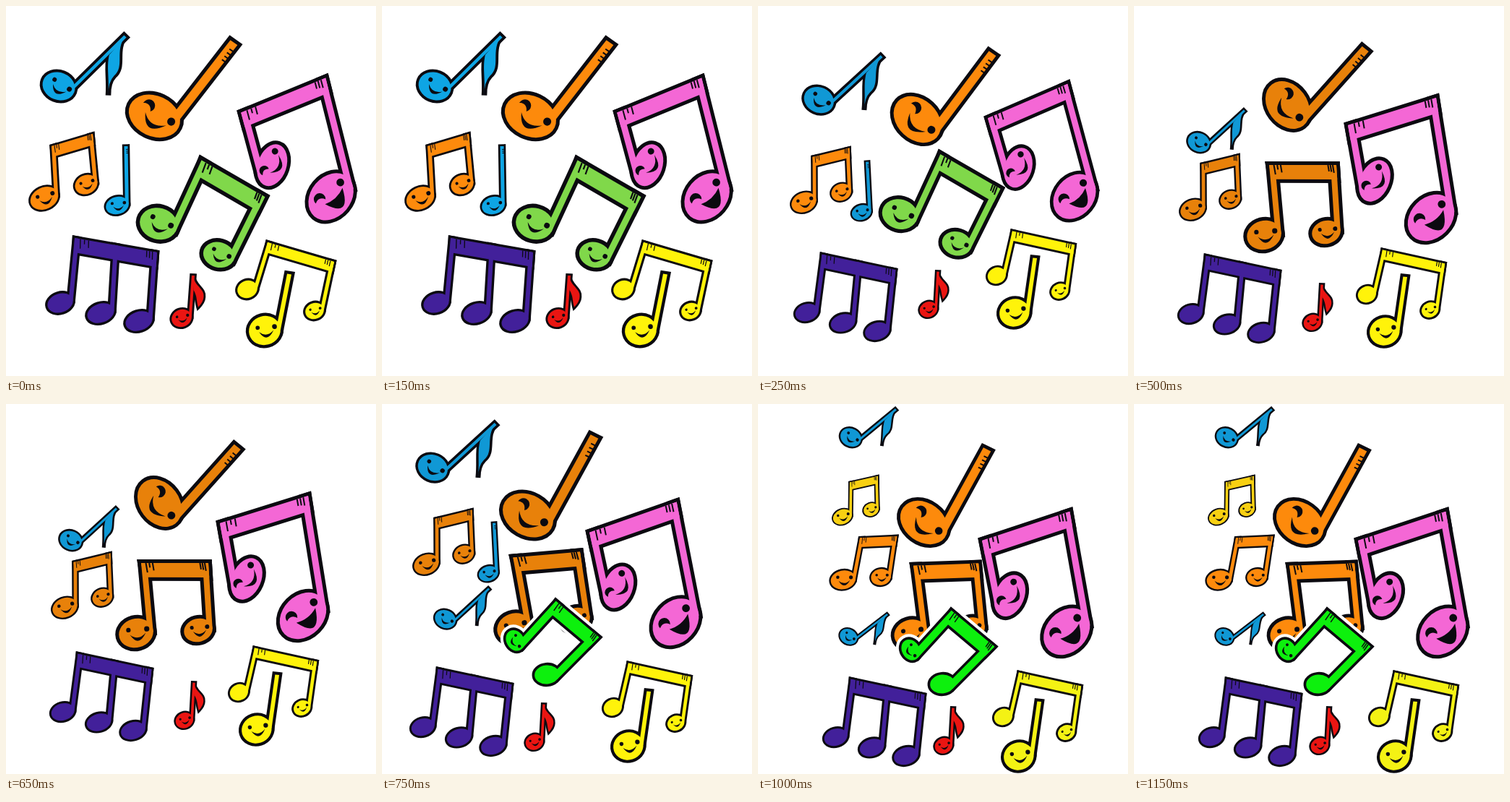
These frames come from a looping animation (512x512 px, 1.25 s). An HTML page with a canvas:

```html
<!DOCTYPE html>
<html lang="en">
<head>
<meta charset="utf-8">
<title>Dancing notes</title>
<style>
html, body { margin: 0; width: 100%; height: 100%; overflow: hidden; background: #fff; }
canvas { display: block; width: 512px; height: 512px; }
</style>
</head>
<body>
<canvas id="stage" width="512" height="512"></canvas>
<script>
const HOLD = 250, STEPS = 5, INK = '#0b0a10';
const ctx = document.getElementById('stage').getContext('2d');

const blue = step => step ? '#1098d5' : '#0ea5e4';
const orange = step => step === 2 || step === 3 ? '#e8810a' : '#fd8a0c';
const greenThenOrange = step => step < 2 ? '#80d84a' : orange(step);
const yellow = step => step < 4 ? '#fff30a' : '#f4f214';
const always = color => () => color;

// Shapes are built from stem tips and heads, measured from the note's first tip.
// Head: x, y, rx, ry, tilt, mood. "curl" bends a flag, "rungs" stripes the stem.
const eighth = {
  line: 3.8, stem: 4.5, curl: .4,
  tips: [[-3, 4]], heads: [[-95, 73, 23, 19, 22, 'smile']]
};
const smallPair = {
  line: 2.7, stem: 5.5, depth: 15,
  tips: [[3, 2], [60, -15]],
  heads: [[-7, 74, 20, 15, -25, 'smile'], [51, 55, 16, 13, -25, 'smile']]
};

// Pose: x, y, turn, size, nod. "settle" is the usual turn and size after the first step.
const notes = [
  { ...eighth, color: blue, settle: [2, .92],
    poses: [[168, 38], [174, 66], [155, 142, 2, .67], [160, 24], [193, 5, 5, .64]] },
  { ...eighth, color: blue, poses: [, , , [150, 253, 2, .64], [181, 289, 7, .54]] },
  { color: blue, line: 2.7, stem: 5, rungs: 3, settle: [-2, .85],
    tips: [[0, 2]], heads: [[-12, 84, 16, 12, -15, 'smile']],
    poses: [[166, 192], [151, 214], , [155, 163]] },
  { ...smallPair, color: orange, settle: [3, .88],
    poses: [[60, 192], [73, 207], [91, 217], [71, 157], [139, 183, 14, .86]] },
  { ...smallPair, color: always('#f8d012'), poses: [, , , , [125, 107, 4, .67]] },
  { color: orange, line: 5, stem: 12, rungs: 4,
    tips: [[-2, 4]], heads: [[-94, 113, 37, 28, 30, 'wink']],
    poses: [[318, 47, 9, 1, -14], [327, 62, 8, .99, 5], [323, 56, 13, .97, 10], [296, 41], [319, 59, 0, .96, 6]] },
  { color: greenThenOrange, line: 5, stem: 8, depth: 20,
    tips: [[5, 4], [98, 4]],
    heads: [[-2, 101, 24, 20, -15, 'smile'], [84, 97, 20, 16, -15, 'smile']],
    poses: [[268, 207, 30, 1.09], [250, 199, 30, 1.03], [182, 216], [176, 209, -5], [210, 220, -2, .97]] },
  { color: always('#f467d5'), line: 5, stem: 9, depth: 21, outward: true,
    tips: [[5, 3], [127, -35]],
    heads: [[42, 80, 30, 20, -67, 'wink'], [120, 131, 36, 28, -45, 'laugh']],
    poses: [[320, 145, -5, .99], [313, 153, -6, .94], [291, 162], [282, 175, -2], [305, 186, -1]] },
  { color: always('#0df00d'), line: 3.6, stem: 10, depth: 18, halo: 4,
    tips: [[4, 4], [82, 4]],
    heads: [[-4, 82, 15, 12, 20, 'smile'], [60, 90, 17, 13, -45]],
    poses: [, , , [240, 267, 40], [267, 280, 40]] },
  { color: always('#42209a'), line: 3.3, stem: 6, depth: 20, settle: [2, .9],
    tips: [[4, 4], [61, 14], [118, 24]],
    heads: [[-16, 94, 18, 13, -18], [40, 108, 19, 13, -18], [93, 119, 19, 13, -18]],
    poses: [[91, 317], [85, 340], [96, 342], [74, 363], [125, 377]] },
  { color: yellow, line: 3.1, stem: 5, depth: 14, settle: [-4, .92],
    tips: [[3, 3], [95, 30]],
    heads: [[-25, 68, 14, 12, -20], [68, 98, 13, 11, -20, 'smile']],
    poses: [[359, 324], [349, 309], [341, 335], [338, 356], [358, 369]] },
  { color: yellow, line: 4.3, stem: 6, settle: [-3, .95],
    tips: [[0, 4]], heads: [[-34, 82, 22, 20, -15, 'smile']],
    poses: [[392, 367], [383, 345], [375, 371], [369, 394], [389, 408]] },
  { color: always('#ea1512'), line: 2.8, stem: 4, curl: .15, settle: [-1, .88],
    tips: [[0, 3]], heads: [[-16, 62, 14, 12, -20, 'smile']],
    poses: [[259, 370], [249, 365], [260, 383], [224, 413], [270, 418]] }
];

const rad = deg => deg * Math.PI / 180;
const add = ([x, y], [dx, dy], k = 1) => [x + dx * k, y + dy * k];
const toward = ([x, y], [x2, y2]) => {
  const d = Math.hypot(x2 - x, y2 - y);
  return [(x2 - x) / d, (y2 - y) / d];
};
const random = i => Math.abs(Math.sin(i * 12.9898) * 43758.5453) % 1;

function polygon(...points) {
  const path = new Path2D();
  points.forEach(p => path.lineTo(...p));
  path.closePath();
  return path;
}

// The stem touches the head at its outermost point; the head nods about that point
function joinHead([x, y, rx, ry, tilt, mood], side, nod) {
  const c = Math.cos(rad(tilt)), s = Math.sin(rad(tilt));
  const reach = Math.hypot(rx * c, ry * s);
  const arm = [side * reach, side * (rx * rx - ry * ry) * s * c / reach];
  const n = Math.cos(rad(nod)), m = Math.sin(rad(nod));
  const joint = [x + arm[0], y + arm[1]];
  const center = [joint[0] - arm[0] * n + arm[1] * m, joint[1] - arm[0] * m - arm[1] * n];
  return { joint, center, rx, ry, tilt: tilt + nod, mood };
}

function flag(tip, down, right, length, curl) {
  const at = (u, v) => add(add(tip, down, u * length), right, v * length);
  const path = new Path2D();
  path.moveTo(...tip);
  path.bezierCurveTo(...at(.25, .03), ...at(.3, .29), ...at(.5, .27));
  path.quadraticCurveTo(...at(.62, .27), ...at(.75, curl));
  path.bezierCurveTo(...at(.56, curl * .6), ...at(.5, .12), ...at(.34, .02));
  path.closePath();
  return path;
}

function build(note, nod) {
  const { tips, stem, depth, curl } = note, last = tips.length - 1;
  const parts = [], marks = new Path2D();
  const heads = note.heads.map((h, i) => joinHead(h, note.outward && i === 0 ? -1 : 1, nod));
  const downs = tips.map((tip, i) => toward(tip, heads[i].joint));
  const across = last ? toward(tips[0], tips[last]) : [downs[0][1], -downs[0][0]];

  tips.forEach((tip, i) => {
    const { joint, center } = heads[i];
    const left = add(tip, across, last ? -stem * i / last : -stem / 2);
    const inner = add(joint, across, note.outward && i === 0 ? stem : -stem);
    const root = add(joint, toward(joint, center), stem * 1.3);
    const edge = inner === joint ? joint : [inner, root, joint];
    if (note.outward && i === 0) edge.reverse();
    parts.push(polygon(add(left, across, stem), left, ...edge));
  });

  if (last) {
    parts.push(polygon(tips[0], tips[last], add(tips[last], downs[last], depth), add(tips[0], downs[0], depth)));
    const span = Math.hypot(tips[last][0] - tips[0][0], tips[last][1] - tips[0][1]);
    for (let i = 0; i < 6; i++) {
      const along = i < 3 ? .07 + i * .05 : .77 + i * .035;
      const top = add(tips[0], across, along * span);
      marks.moveTo(...top);
      marks.lineTo(...add(top, downs[0], depth * (.3 + .4 * random(i + 1))));
    }
  }
  if (curl) {
    const length = Math.hypot(heads[0].joint[0] - tips[0][0], heads[0].joint[1] - tips[0][1]);
    parts.push(flag(tips[0], downs[0], across, length, curl));
  }
  for (let i = 0; i < (note.rungs || 0); i++) {
    const mid = add(tips[0], downs[0], stem * (.9 + i * .5));
    marks.moveTo(...mid);
    marks.lineTo(...add(mid, across, stem / 2));
  }
  for (const h of heads) {
    const oval = new Path2D();
    oval.ellipse(...h.center, h.rx, h.ry, rad(h.tilt), 0, 2 * Math.PI);
    parts.push(oval);
  }
  return { parts, marks, heads };
}

function drawFace({ center, rx, tilt, mood }) {
  ctx.save();
  ctx.translate(...center);
  ctx.rotate(rad(tilt + 11));
  ctx.scale(rx, rx);
  ctx.translate(.1, -.2);
  ctx.fillStyle = INK;
  const eye = (x, r) => {
    ctx.beginPath();
    ctx.arc(x, 0, r, 0, 7);
    ctx.fill();
  };
  eye(.53, .15);
  if (mood === 'smile') {
    eye(-.53, .13);
  } else {
    ctx.beginPath();
    ctx.arc(-.5, 0, .23, rad(170), rad(400));
    ctx.quadraticCurveTo(-.48, -.12, -.73, .04);
    ctx.fill();
  }
  const open = mood === 'laugh';
  ctx.beginPath();
  ctx.moveTo(-.46, .28);
  ctx.quadraticCurveTo(0, open ? 1.35 : 1.05, .46, .22);
  ctx.quadraticCurveTo(0, open ? .45 : .68, -.46, .28);
  ctx.fill();
  ctx.restore();
}

function drawNote(note, step) {
  if (!note.poses[step]) return;
  const [usualTurn, usualSize] = step && note.settle || [0, 1];
  const [x, y, turn = usualTurn, size = usualSize, nod = 0] = note.poses[step];
  const { parts, marks, heads } = build(note, nod);
  const outline = (color, width) => {
    ctx.strokeStyle = color;
    ctx.lineWidth = width * 2;
    parts.forEach(p => ctx.stroke(p));
  };
  ctx.save();
  ctx.translate(x, y);
  ctx.rotate(rad(turn));
  ctx.scale(size, size);
  ctx.miterLimit = 2.5;
  if (note.halo) outline('#fff', note.line + note.halo);
  outline(INK, note.line);
  ctx.fillStyle = note.color(step);
  parts.forEach(p => ctx.fill(p));
  ctx.strokeStyle = INK;
  ctx.lineWidth = note.line * .4;
  ctx.stroke(marks);
  heads.filter(h => h.mood).forEach(drawFace);
  ctx.restore();
}

const start = performance.now();
function tick() {
  const step = Math.floor((performance.now() - start) / HOLD) % STEPS;
  ctx.fillStyle = '#fff';
  ctx.fillRect(0, 0, 512, 512);
  notes.forEach(note => drawNote(note, step));
  requestAnimationFrame(tick);
}
tick();
</script>
</body>
</html>
```
